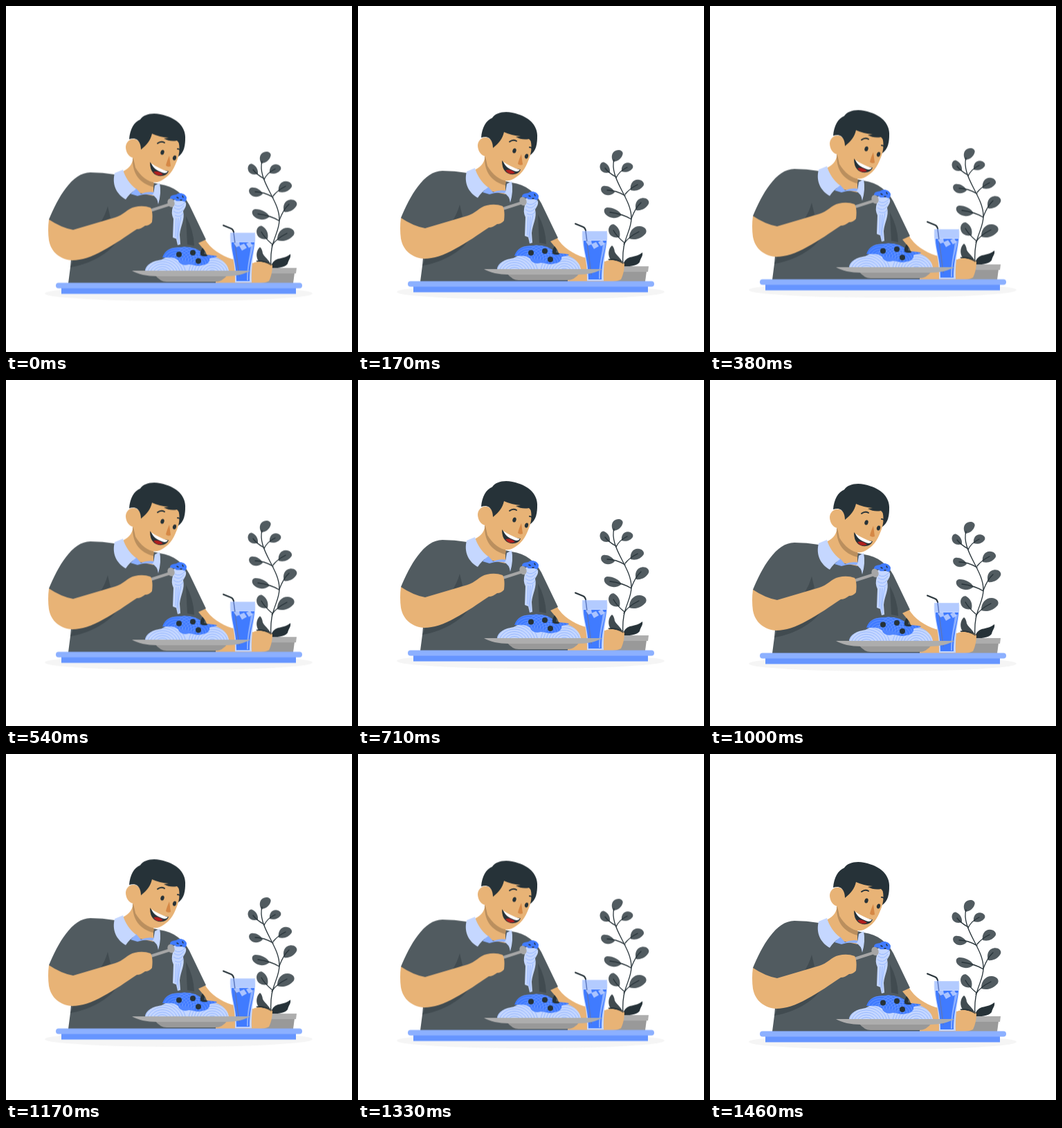
These frames come from a looping animation (500x500 px, 1500 ms). An HTML page without scripts:

```html
<!DOCTYPE html>
<html lang="en">
<head>
<meta charset="utf-8">
<title>Lunch</title>
<style>
  html, body { margin: 0; width: 100%; height: 100%; overflow: hidden; background: #fff; }
  svg { display: block; width: 100%; height: 100%; }
  .float { animation: float 1.5s -40ms linear infinite; }
  @keyframes float { 50% { transform: translateY(-10px); } }
  .ink { fill: #263238; }
  .shirt { fill: #515b60; }
  .fold { fill: #414b50; }
  .skin { fill: #e8b376; }
  .blue { fill: #407bff; }
  .sky { fill: #8cb0ff; }
  .pale { fill: #c5d7ff; }
  .line { fill: none; stroke: #263238; stroke-linecap: round; stroke-linejoin: round; }
  .strand { fill: none; stroke: #8cb0ff; stroke-width: .8; }
  .sauce { fill: none; stroke: #7aa3ff; stroke-width: .6; }
</style>
</head>
<body>
<svg viewBox="0 0 500 500">
  <defs>
    <path id="leaf" d="M0 0C-7-4-9-11-5-16C-2-20 4-21 6-17C8-11 6-4 0 0Z"/>
    <path id="mound" d="M201 383C202 374 212 369 225 367C238 358 270 356 291 361C307 362 321 372 322 383Z"/>
    <path id="topping" d="M226 364C230 352 240 349 252 349C264 347 279 351 285 359C290 361 299 360 305 362C303 365 297 363 294 366C295 371 290 374 284 375C277 378 271 374 264 374C258 376 250 374 249 368C242 362 234 364 226 364Z"/>
    <clipPath id="inMound"><use href="#mound"/></clipPath>
    <clipPath id="inTopping"><use href="#topping"/></clipPath>
    <g id="ripples">
      <ellipse rx="6" ry="5"/><ellipse rx="10" ry="8.5"/><ellipse rx="14" ry="12"/>
      <ellipse rx="18" ry="15.5"/><ellipse rx="22" ry="19"/><ellipse rx="26" ry="22.5"/>
      <ellipse rx="30" ry="26"/><ellipse rx="34" ry="29.5"/>
    </g>
  </defs>

  <g class="float">
    <ellipse cx="249.5" cy="416" rx="193.5" ry="11" fill="#f5f5f5"/>

    <!-- plant -->
    <g class="shirt">
      <use href="#leaf" transform="translate(369 228) rotate(30)"/>
      <use href="#leaf" transform="translate(381 242) rotate(53) scale(.93)"/>
      <use href="#leaf" transform="translate(364 243) rotate(-50) scale(.92)"/>
      <use href="#leaf" transform="translate(394 269) rotate(51) scale(1.1)"/>
      <use href="#leaf" transform="translate(371 272) rotate(-78) scale(.92 1.05)"/>
      <use href="#leaf" transform="translate(402 298) rotate(42) scale(1.15)"/>
      <use href="#leaf" transform="translate(381 305) rotate(-77) scale(1 1.34)"/>
      <use href="#leaf" transform="translate(392 339) rotate(55) scale(1.25 1.4)"/>
      <use href="#leaf" transform="translate(378 337) rotate(-42) scale(1.1)"/>
    </g>
    <g class="line" stroke-width="1.3">
      <path d="M383 380C382 362 383 352 386 343C390 329 395 322 395 309C395 287 377 267 371 246C369 239 368 232 370 225"/>
      <path d="M373 251Q378 241 389 236M373 250Q362 244 357 237M386 275Q392 267 404 261M386 277Q373 269 360 269M395 310Q401 294 409 287M395 311Q382 303 364 301M384 347Q390 337 406 329M385 345Q374 336 369 327"/>
    </g>
    <path class="fold" d="M367 349C361 354 361 364 365 369L383 379C384 369 374 365 371 358Q370 351 367 349Z"/>
    <path class="ink" d="M362 369C370 367 379 370 384 374C390 362 400 368 411 359C412 365 408 367 407 373C402 380 390 378 383 381C374 382 366 375 362 369Z"/>
    <path fill="#999" d="M350 386H417L415 401H353Z"/>
    <path fill="#adadad" d="M348 379H420L419 387H350Z"/>

    <!-- far arm -->
    <path class="skin" d="M270 344L287 337C296 352 311 361 326 366L357 372C366 368 378 371 385 375C385 384 383 392 380 398C373 402 365 401 354 401H300L285 380Z"/>
    <path d="M362 369C370 369 377 371 383 375" class="line" stroke-width="1"/>

    <!-- shirt -->
    <path class="shirt" d="M62 309C75 278 95 241 122 241Q140 241 157 244L222 258C243 261 257 273 265 288L289 338L278 343L288 355L303 391V401H90L93 378L97 332Q79 327 63 313Z"/>
    <path class="fold" d="M260 304Q271 324 272 347L262 345ZM147 290Q143 304 136 314L151 307ZM93 378C118 374 143 362 158 344L98 366Z"/>

    <!-- neck and collar -->
    <path class="skin" d="M184 215C184 228 179 235 168 240L181 268L213 275L213 252Z"/>
    <path fill="#ba8f5e" d="M183 219C190 239 200 249 214 256L213 262C194 257 182 244 183 219Z"/>
    <path class="sky" d="M180 272L188 264L195 272Q204 268 215 270L220 276L217 275Q203 270 190 275Z"/>
    <path class="pale" d="M157 242L169 237C172 248 179 258 188 265Q179 271 173 280C159 272 153 258 157 242ZM213 272L215 260L222 256Q225 270 220 287Q219 277 211 273Z"/>

    <!-- head -->
    <path class="ink" d="M235 180L259 190C259 202 258 212 248 219Z"/>
    <path class="skin" d="M207 181L248 191C253 207 250 218 245 229C239 244 230 250 222 254C210 259 196 249 187 234L184 220C177 219 173 211 173 204C174 193 187 188 194 199Z"/>
    <path class="ink" d="M178 193C179 179 185 168 194 164.500C200 155 217 153.500 232 159.500C250 165 260 178 259 192Q257 203 252 209Q253 200 247 195Q237 197 228 192L235 191Q222 190 211 185C209 194 204 201 195 208C195 200 192 193 185 192Q181 192 178 193Z"/>
    <path class="line" stroke-width="2" d="M219 199Q224 195 229 198M248 207Q251 207 252 209"/>
    <ellipse class="ink" cx="226" cy="212" rx="2.6" ry="3.6" transform="rotate(15 226 212)"/>
    <ellipse class="ink" cx="243.5" cy="220" rx="2.5" ry="3.6" transform="rotate(15 243.5 220)"/>
    <path fill="#d58745" d="M236 217Q232 226 231 231Q234 234 238 232Z"/>
    <path class="ink" d="M208 226C213 233 223 238 235 239C232 248 218 248 213 242Q208 237 208 226Z"/>
    <path fill="#fff" d="M210 228C216 232 225 237 234 239.500Q232 242 229 242C221 240 213 236 210 228Z"/>
    <path fill="#b0201f" d="M213 240Q221 238 227 244Q218 248 213 240Z"/>

    <!-- glass -->
    <path class="line" stroke-width="2" d="M314 317.500L325 322Q328 323 329 327L331 337"/>
    <path class="pale" d="M324 328H360C362 349 354 365 355 400H331C332 366 322 350 324 328Z"/>
    <path fill="#b3cbff" d="M325 329H359L360 341H325Z"/>
    <path class="blue" d="M326 342H359C358 358 352 371 352 398H333C333 371 326 358 326 342Z"/>
    <path class="sky" d="M354 345H358C356 361 350 371 350 397H348C348 374 353 360 354 345Z"/>
    <path class="line" stroke-width="1.5" style="stroke:#5b76bd" d="M329 328L337 391"/>
    <path class="pale" opacity=".8" d="M329 343L337 341L338 347L333 349ZM337 347L344 344L348 350L341 354ZM347 344L353 341L356 347L351 350Z"/>

    <!-- plate of spaghetti -->
    <path fill="#999" d="M215 389H320Q313 399 302 399H232Q223 399 215 389Z"/>
    <path fill="#adadad" d="M182 383H353C345 388 332 391 317 391H218C204 391 190 388 182 383Z"/>
    <use href="#mound" class="pale"/>
    <g class="strand" clip-path="url(#inMound)">
      <use href="#ripples" x="226" y="389"/>
      <use href="#ripples" x="298" y="387"/>
    </g>
    <use href="#topping" class="blue"/>
    <g class="sauce" clip-path="url(#inTopping)">
      <use href="#ripples" x="246" y="369"/>
      <use href="#ripples" x="275" y="374"/>
    </g>
    <g class="ink">
      <circle cx="250" cy="359.5" r="4"/><circle cx="270" cy="357" r="4"/><circle cx="278" cy="369" r="4"/>
      <path d="M284 350Q289 355 285 360Q277 361 284 350ZM280 360Q286 357 292 361Q286 364 280 360Z"/>
    </g>

    <!-- fork and its bite -->
    <path class="pale" d="M238 286C240 279 255 276 260 285C261 290 258 293 256 297C259 309 252 318 251 331L252 345L248 346L246 337L241 335L242 308Q238 300 241 291Z"/>
    <path class="strand" d="M243 292Q251 298 257 289M242 297Q250 303 256 295M244 303Q252 307 256 300M246 307L245 334M249 307L247 338M253 305Q248 322 249 344M244 288Q251 293 259 284"/>
    <path class="blue" d="M237 279C237 273 243 274 246 273C250 269 259 271 261 277Q261 284 257 283C252 280 247 285 244 280Z"/>
    <path class="line" stroke-width="1.5" d="M247 277L249 278M255 275L256 277M252 281L254 281"/>
    <path fill="none" stroke="#a6a6a6" stroke-width="4" d="M209 296L237 287"/>
    <ellipse cx="238.5" cy="285" rx="5" ry="6.5" fill="#a6a6a6" transform="rotate(-20 238.5 285)"/>

    <!-- near arm -->
    <path class="skin" d="M62 309Q80 321 97 324L158 306C169 303 176 293 186 291Q198 288 209 292C212 297 212 305 211 313Q207 318 201 318C197 321 193 323 189 323C174 333 157 345 140 354C124 363 109 368 96 368C78 367 65 356 62 339Q60 324 62 309Z"/>

    <!-- table -->
    <rect x="80" y="405" width="339" height="11.5" fill="#6695ff"/>
    <rect x="72" y="400.5" width="356" height="8" rx="4" class="sky"/>
  </g>
</svg>
</body>
</html>
```
